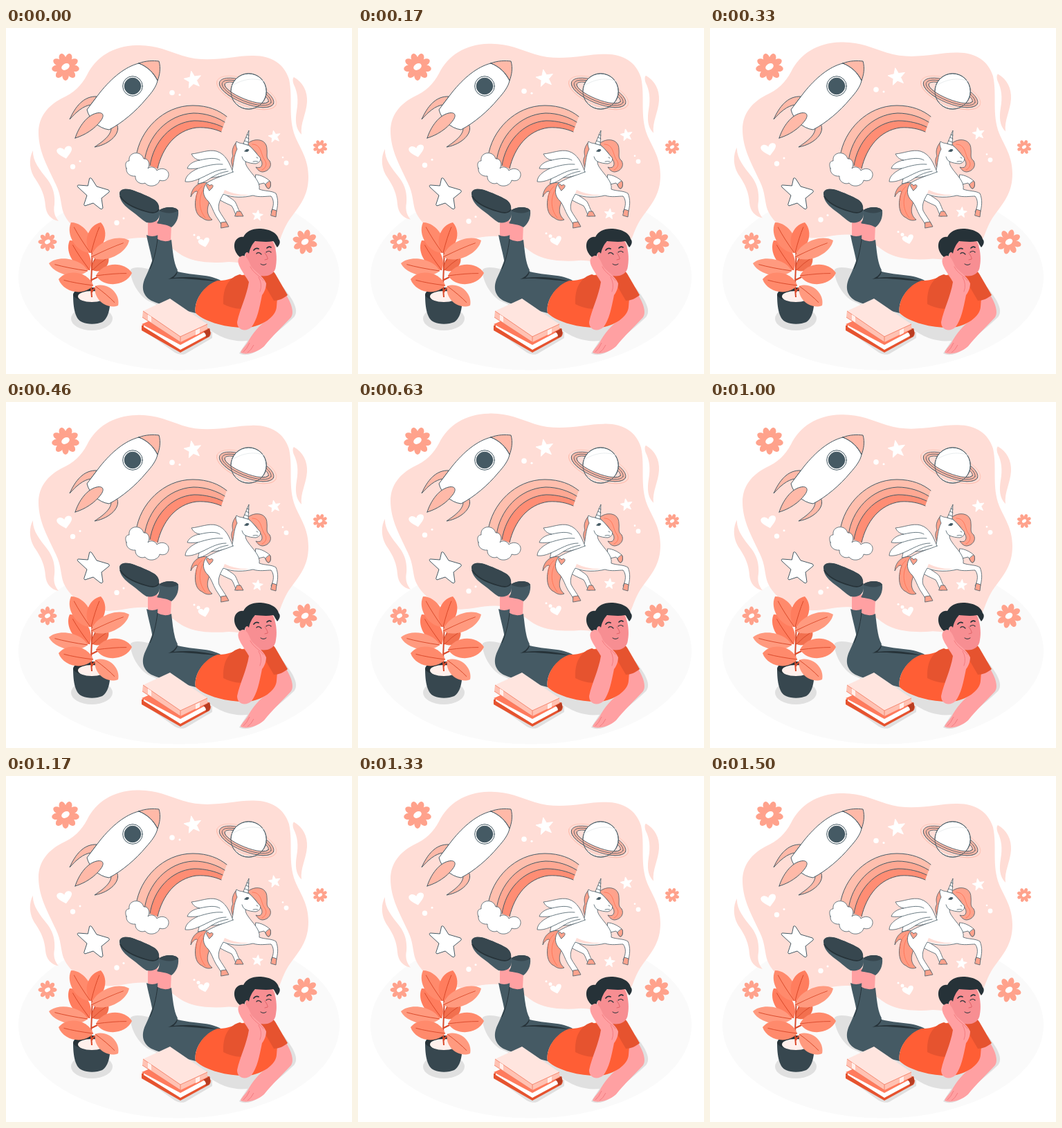
Recreate the animation shown at these times as an HTML page. Size 500 by 500 pixels, loop 1540 ms.

```html
<!DOCTYPE html>
<html lang="en">
<head>
<meta charset="utf-8">
<title>Daydream</title>
<style>
html, body { margin: 0; width: 100%; height: 100%; overflow: hidden; background: #fff; }
svg { display: block; width: 100vw; height: 100vh; }
.ln { stroke: #455a64; stroke-width: 1; stroke-linejoin: round; stroke-linecap: round; }
.thin { stroke: #455a64; stroke-width: .8; stroke-linejoin: round; stroke-linecap: round; }
.no { fill: none; }
.w { fill: #fff; }
.c { fill: #ffa28c; }
.p { fill: #ffb9a8; }
.b { fill: #ffddd6; }
.skin { fill: #ffa0a2; }
</style>
</head>
<body>
<svg viewBox="0 0 500 500" xmlns="http://www.w3.org/2000/svg">
  <ellipse cx="250" cy="360" rx="232" ry="134.5" fill="#fafafa"/>

  <g id="drift">
    <path class="b" d="M189 25C215 24 234 33 255 40C292 52 326 40 355 40C382 39 402 51 409 74C415 102 407 129 418 157C425 174 437 189 437 215C437 243 424 257 411 275C395 297 397 318 377 333C361 347 342 338 322 338C302 340 280 339 264 333C245 326 234 309 214 305C190 299 170 308 148 308C118 307 92 289 83 267C79 256 80 242 72 226C61 202 47 179 47 151C47 128 61 112 80 102C98 94 109 83 117 68C130 42 154 26 189 25Z"/>
    <path class="b" d="M416 71C429 78 436 92 435 107C434 124 425 138 427 154C418 145 418 133 420 120C423 104 421 92 416 82C414 77 414 73 416 71Z"/>
    <path class="b" d="M39 177C38 192 49 205 60 219C69 231 71 243 70 255C68 266 71 273 76 279C65 277 58 269 57 257C56 242 51 231 43 219C34 207 32 190 39 177Z"/>
    <g id="bits" class="w"></g>
  </g>

  <g id="flowers"></g>

  <!-- rocket -->
  <g class="ln">
    <path class="p" d="M131 99C112 98 100 114 92 132C102 121 111 113 122 111Z"/>
    <path class="p" d="M160 139C167 151 151 168 128 172C143 162 152 154 152 145Z"/>
    <path class="w" d="M192 51C172 56 153 72 136 93L117 118C120 131 133 145 149 147C168 137 188 120 202 103C211 93 217 85 219 76C213 65 205 56 192 51Z"/>
    <path class="p" d="M192 51C202 47 213 47 221 48C224 58 222 68 219 76C214 65 205 56 192 51Z"/>
    <path class="p" d="M100 159C105 143 117 126 131 123C140 121 143 126 137 134C128 146 114 155 100 159Z"/>
    <circle class="w" cx="183" cy="84" r="14.3"/>
    <circle cx="183" cy="84" r="11.8" fill="#455a64"/>
  </g>

  <!-- planet -->
  <g transform="rotate(22 349 93)">
    <g id="ring" class="no">
      <ellipse cx="348" cy="94" rx="46" ry="18.5" stroke="#ffb9a8" stroke-width=".6"/>
      <path class="p" fill-rule="evenodd" d="M306 94a42 15.5 0 1 0 84 0a42 15.5 0 1 0 -84 0ZM314 94a34 9.5 0 1 0 68 0a34 9.5 0 1 0 -68 0Z"/>
      <g class="thin" stroke-width=".6">
        <ellipse cx="348" cy="94" rx="42" ry="15.5"/>
        <ellipse cx="348" cy="94" rx="38" ry="12.5"/>
        <ellipse cx="348" cy="94" rx="34" ry="9.5"/>
      </g>
    </g>
    <circle class="w thin" cx="350" cy="91" r="25.7"/>
    <path class="b" d="M325 98C332 107 367 108 374 97A25.7 25.7 0 0 1 325 98Z"/>
    <clipPath id="front"><path d="M298 94h104v26h-104Z"/></clipPath>
    <use href="#ring" clip-path="url(#front)"/>
    <circle class="no thin" cx="350" cy="91" r="25.7"/>
  </g>
  <path class="no" d="M326 84C342 73 361 71 375 78" stroke="#dfe4e6" stroke-width=".7"/>

  <!-- rainbow -->
  <path d="M188 186C193 148 227 112 270 112C292 112 308 119 319 128L311 150C302 146 290 143 275 144C245 148 226 173 219 203Z" fill="#ffbfae"/>
  <path d="M200 193C204 158 232 125 271 123C289 123 305 129 316 136L311 150C302 146 290 143 275 144C245 148 226 173 219 203Z" fill="#ffa893"/>
  <path d="M208 199C213 165 238 136 272 134C288 134 303 138 313 143L311 150C302 146 290 143 275 144C245 148 226 173 219 203Z" fill="#ff8d74"/>
  <g class="ln no">
    <path d="M188 186C193 148 227 112 270 112C292 112 308 119 319 128"/>
    <path d="M200 193C204 158 232 125 271 123C289 123 305 129 316 136"/>
    <path d="M208 199C213 165 238 136 272 134C288 134 303 138 313 143"/>
    <path d="M219 203C226 173 245 148 275 144C290 143 302 146 311 150"/>
  </g>
  <path class="w thin" d="M174 203C171 196 174 192 178 192C176 179 195 176 199 189C206 188 209 197 205 203C209 199 216 201 218 206C226 200 236 205 235 213C234 220 228 222 222 220C220 229 206 231 201 224C195 227 186 222 187 214C180 215 173 210 174 203Z"/>

  <path class="w ln" d="M121 217Q123 216 124 218L131 229L148 234Q151 236 148 238L138 246L140 260Q139 263 136 261L126 253L114 257Q112 256 113 254L117 242L104 230Q102 227 105 227L118 228Z"/>

  <!-- unicorn -->
  <g class="thin">
    <path fill="#ff9a82" d="M292 224C279 221 268 230 267 244C270 238 275 234 277 237C272 248 271 269 283 274C288 278 293 279 298 277C288 269 291 258 295 249C299 239 297 229 292 224Z"/>
    <path class="no" d="M288 230C278 240 277 262 288 274M283 229C276 235 274 243 275 249" stroke="#ff6f50"/>
    <path class="w" d="M361 212C368 212 377 217 381 221C384 224 382 233 379 232C376 231 375 226 373 224L360 227Z"/>
    <path class="c" d="M381 221C384 224 382 233 379 232C376 231 376 228 375 226Z"/>
    <path class="w" d="M313 236C319 244 327 246 331 251C334 256 335 261 338 266L341 271L333 272C330 266 329 261 326 257C318 253 309 250 304 244Z"/>
    <path class="c" d="M334 265L339 265L343 272L331 272Z"/>
    <path fill="#ffa28c" d="M349 167C359 158 377 160 377 175C378 184 375 187 381 192C385 199 380 207 371 208C366 208 363 204 361 201C366 203 370 201 370 196C370 190 365 188 362 181Z"/>
    <path class="no" d="M356 168C370 168 368 184 374 191C378 197 375 203 370 205" stroke="#ff6f50"/>
    <path fill="#ffa28c" d="M333 165C327 172 326 179 328 185C324 191 326 199 330 205L336 180Z"/>
    <path class="w" d="M290 224C283 232 284 243 292 250C297 256 299 264 303 271L312 285L320 284C317 277 311 270 308 264C306 257 308 250 314 240C328 246 344 245 357 242C366 245 376 243 383 243C388 249 387 258 383 266L390 268C393 258 394 248 390 239C384 235 374 236 366 233C368 222 356 212 350 203C347 199 346 196 346 193C351 195 356 196 361 196C366 195 369 191 367 187C361 181 357 174 350 169C344 166 339 168 333 164C331 168 333 172 334 175C329 184 329 197 327 205C317 214 304 215 290 224Z"/>
    <path class="c" d="M311 281L318 280L322 287L311 289Z"/>
    <path class="c" d="M385 262L391 264L390 273L383 271Z"/>
    <path class="w" d="M343 167L351 148L350 169Z"/>
    <path class="no" d="M345 163L350 165M347 158L351 160M348 154L351 155"/>
    <path d="M345 178Q347 174 351 176Q350 180 345 178Z" fill="#455a64"/>
    <path class="no" d="M362 187L364 188M357 193Q361 192 364 193M341 186Q342 191 346 193"/>
    <path class="c" d="M290 229C288 225 293 224 294 228C297 225 301 227 298 231L294 235Z"/>
    <path class="b" stroke="none" d="M314 239Q334 245 352 241Q332 242 316 234Z"/>
    <path class="w" d="M328 208C323 196 318 182 304 178C293 175 280 181 268 182C271 188 275 190 280 191C273 192 264 196 262 203C268 204 272 203 277 203C269 207 259 213 259 222C267 223 274 220 279 218C278 222 278 224 277 225C286 224 292 219 297 216C307 216 318 212 328 208Z"/>
    <path class="no" d="M280 191C293 188 303 187 309 191M277 203C290 199 301 196 313 197M279 218C293 212 304 204 318 204M297 216Q308 209 321 207"/>
  </g>

  <!-- shadows -->
  <g fill="#e0e0e0">
    <path d="M180 349C187 343 205 347 220 353L300 380L401 375C416 394 424 409 416 418C397 436 378 449 367 463C357 473 342 474 337 470L349 452C331 454 310 449 290 433L205 394C189 384 179 362 180 349Z"/>
    <ellipse cx="124" cy="420" rx="30" ry="17"/>
    <path d="M195 434L214 424L298 439L298 448L259 471C253 473 248 471 244 469Z"/>
  </g>

  <!-- plant -->
  <path d="M97 385C97 405 100 421 110 425C119 429 132 428 139 425C149 419 151 402 151 385Z" fill="#37474f"/>
  <ellipse cx="124" cy="385" rx="27" ry="10" fill="#263238"/>
  <ellipse cx="124" cy="388" rx="20" ry="8" fill="#fff0ec"/>
  <path class="no" d="M124 389C121 363 126 342 124 318M124 372L112 360M124 350Q126 336 132 329M124 382Q126 374 136 374M124 364L138 357" stroke="#d9492a" stroke-width="2"/>
  <g id="leaves"></g>

  <!-- legs -->
  <path class="skin" d="M205 275L221 279L220 302L205 301Z"/>
  <path d="M203 299Q211 303 220 299L248 352C270 358 295 355 312 366L292 378L228 369L213 350C212 333 206 316 203 299Z" fill="#455a64"/>
  <path class="skin" d="M220 281L239 284L238 308Q229 311 219 306Z"/>
  <path d="M164 239C165 232 174 232 182 234C193 238 206 243 214 248C221 252 221 260 222 268C222 278 214 283 203 281C196 277 187 268 178 262C169 255 164 248 164 239Z" fill="#455a64"/>
  <path d="M164 239C165 232 174 232 182 234C193 238 206 243 214 248C220 252 222 257 221 262C218 269 211 268 202 265C188 260 167 253 164 239Z" fill="#37474f"/>
  <path class="no" d="M165 243C171 254 188 261 202 265C211 268 218 268 221 262" stroke="#263238" stroke-width="1.6"/>
  <path d="M221 264C228 258 245 257 249 264C250 274 246 283 239 288C231 283 224 284 218 282C222 277 222 271 221 264Z" fill="#455a64"/>
  <path d="M221 264C228 258 245 257 249 264C241 269 230 268 221 264Z" fill="#37474f"/>
  <path d="M219 305Q230 311 239 306C241 322 242 339 248 350L235 363C258 361 281 364 305 366C284 374 271 395 274 412C250 406 227 402 210 394C195 385 196 371 202 359C211 340 216 323 219 305Z" fill="#455a64"/>
  <path d="M248 350C245 357 240 361 234 363C253 360 277 364 305 366C282 360 262 359 242 361C246 358 248 354 248 350Z" fill="#263238"/>
  <path class="no" d="M219 305C217 322 213 338 208 348" stroke="#263238" stroke-width="1"/>

  <!-- torso and arms -->
  <path class="skin" d="M405 386C412 397 417 411 412 418C399 432 384 446 373 460C362 470 345 473 339 469C341 463 348 458 351 451C360 436 372 424 384 417C388 409 387 402 386 394Z"/>
  <path class="no" d="M352 455Q348 464 343 468M358 458Q354 466 349 469" stroke="#f47c80"/>
  <path d="M306 365C286 371 271 394 274 412C290 427 325 434 350 433C369 431 390 418 391 403L394 364L375 350L342 357C330 360 318 366 306 365Z" fill="#ff5e35"/>
  <path d="M366 358C374 349 384 347 389 355L407 386C401 391 394 394 387 394Z" fill="#e6532f"/>
  <path d="M338 356C321 361 313 376 314 399C324 404 335 407 345 405L356 363Z" fill="#e6532f"/>

  <!-- head -->
  <path fill="#f78e92" d="M346 330C346 313 363 302 384 306C391 316 392 333 390 344C389 356 378 360 367 358C353 352 347 341 346 330Z"/>
  <path d="M346 334C338 334 329 324 330 313C331 305 337 301 343 302C347 294 355 290 366 290C378 290 392 295 394 305C397 308 396 313 392 317C389 313 388 309 386 308C375 310 366 308 360 308C355 313 352 320 351 326C349 322 345 324 345 330Z" fill="#263238"/>
  <path class="skin" d="M337 332C345 324 350 334 354 344C359 352 371 357 376 369C376 376 373 382 370 386C366 406 363 421 355 432C347 440 334 437 334 425C338 406 348 387 351 367C344 354 331 340 337 332Z"/>
  <g class="no" stroke-linecap="round">
    <path d="M353 345C358 355 367 358 372 365M365 360Q371 370 367 381" stroke="#f47c80"/>
    <path d="M358 321Q361 317 365 319M377 318Q380 315 383 317" stroke="#263238" stroke-width="1.7"/>
    <path d="M362 326Q365 323 369 327M376 324Q380 321 383 324" stroke="#263238" stroke-width="1.2"/>
    <path d="M374 325Q379 332 378 334L374 335" stroke="#df6368"/>
    <path d="M368 341Q372 344 376 341" stroke="#263238"/>
  </g>

  <!-- books -->
  <path d="M196 430L238 414L295 438Q297 442 294 446L252 469L196 437Z" fill="#e6532f"/>
  <path class="w" d="M199 424L252 457L291 437L291 444L252 465L199 432Z"/>
  <path d="M196 428L236 411L295 435L252 458Z" fill="#ff7b5d"/>
  <path d="M285 439L294 434Q297 441 293 446L288 448Q291 443 285 439Z" fill="#b93d22"/>
  <path d="M198 409L252 445L291 427L291 435L252 454L197 418Z" fill="#ffc2b3"/>
  <path d="M198 409L237 391L291 428L252 446Z" fill="#ffe5df"/>
  <path class="no" d="M198 409L252 446V454M252 446L291 428M197 418L252 454" stroke="#f2765c" stroke-width=".8"/>
  <path d="M205 414l5 3.3v8l-5-3.3ZM274 437l6-3v7l-6 3Z" fill="#fff0ec"/>
</svg>
<script>
const el = id => document.getElementById(id);
const polar = (r, a) => [r * Math.cos(a), r * Math.sin(a)];

function star(x, y, r, turn) {
  let d = "";
  for (let i = 0; i < 10; i++) {
    const [px, py] = polar(i % 2 ? r * .43 : r, turn + i * Math.PI / 5);
    d += (i ? "L" : "M") + (x + px) + " " + (y + py);
  }
  return `<path d="${d}Z" stroke="#fff" stroke-linejoin="round"/>`;
}

const heart = (x, y, s, turn) =>
  `<path transform="translate(${x} ${y}) rotate(${turn}) scale(${s})" d="M0 9C-6 4 -11 0 -11 -4C-11 -9 -3 -10 0 -4C3 -10 11 -9 11 -4C11 0 6 4 0 9Z"/>`;

const dot = ([x, y, r]) => `<circle cx="${x}" cy="${y}" r="${r}"/>`;

function flower(x, y, r, n, turn) {
  let s = "";
  for (let i = 0; i < n; i++) {
    s += `<ellipse cx="${r * .63}" rx="${r * .37}" ry="${r * .24}" transform="rotate(${turn + i * 360 / n})"/>`;
  }
  return `<g class="c" transform="translate(${x} ${y})">${s}<circle r="${r * .46}"/>` +
    `<ellipse class="w" rx="${r * .31}" ry="${r * .22}" transform="rotate(-30)"/></g>`;
}

// A leaf from its base to its tip, with a midrib.
function leaf([x, y, tx, ty, w, fill]) {
  const len = Math.hypot(tx - x, ty - y);
  const turn = Math.atan2(ty - y, tx - x) * 180 / Math.PI;
  const h = w * .67;
  return `<g transform="translate(${x} ${y}) rotate(${turn})">` +
    `<path fill="${fill}" d="M0 0C${len * .2} ${-h} ${len * .8} ${-h} ${len} 0C${len * .8} ${h} ${len * .2} ${h} 0 0Z"/>` +
    `<path class="no" stroke="#d9492a" stroke-width=".9" d="M0 0Q${len * .5} -1.5 ${len * .85} 0"/></g>`;
}

el("bits").innerHTML =
  star(270, 75, 13, -1.75) + star(388, 157, 9, -1.75) + star(363.5, 271, 8, -1.45) +
  heart(85, 180, 1, -12) + heart(286.5, 310, .75, -15) +
  [[240, 93.5, 3.8], [251, 96.5, 1.5], [96.5, 200.5, 3.7], [107, 192.5, 1.5], [405, 195, 3.4],
   [400, 187, 1.3], [160, 281.5, 3.7], [170, 275, 1.5], [272, 299, 1.5], [278, 303, 2.5]].map(dot).join("");

el("flowers").innerHTML = flower(86, 56, 20, 9, 10) + flower(432, 309, 18, 8, 15) +
  flower(60, 309, 13.5, 8, 0) + flower(454, 172, 10.5, 8, 20);

el("leaves").innerHTML = [
  [125, 350, 148, 331, 18, "#f2704f"],
  [121, 350, 92, 307, 25, "#ff7d5e"],
  [122, 325, 94, 281, 25, "#ff8a6c"],
  [123, 325, 137, 281, 25, "#ff7d5e"],
  [123, 331, 178, 307, 25, "#ff9a7f"],
  [118, 351, 62, 340, 23, "#ff9a7f"],
  [126, 372, 76, 363, 27, "#ff8a6c"],
  [130, 358, 182, 354, 28, "#ff8a6c"],
  [129, 373, 162, 401, 24, "#ff9a7f"]
].map(leaf).join("");

const LOOP = 1540, STEP = 1000 / 24, FLOAT = 1500, RISE = 10;

function draw(ms) {
  const k = Math.min(36, Math.floor((ms % LOOP + 4) / STEP));
  const p = k * STEP / FLOAT;
  const up = RISE * (1 - Math.abs(1 - 2 * p));
  el("drift").setAttribute("transform", `translate(0 ${-up.toFixed(3)})`);
}

let start;
function tick(now) {
  if (start === undefined) start = now;
  draw(now - start);
  requestAnimationFrame(tick);
}
draw(0);
requestAnimationFrame(tick);
</script>
</body>
</html>
```
